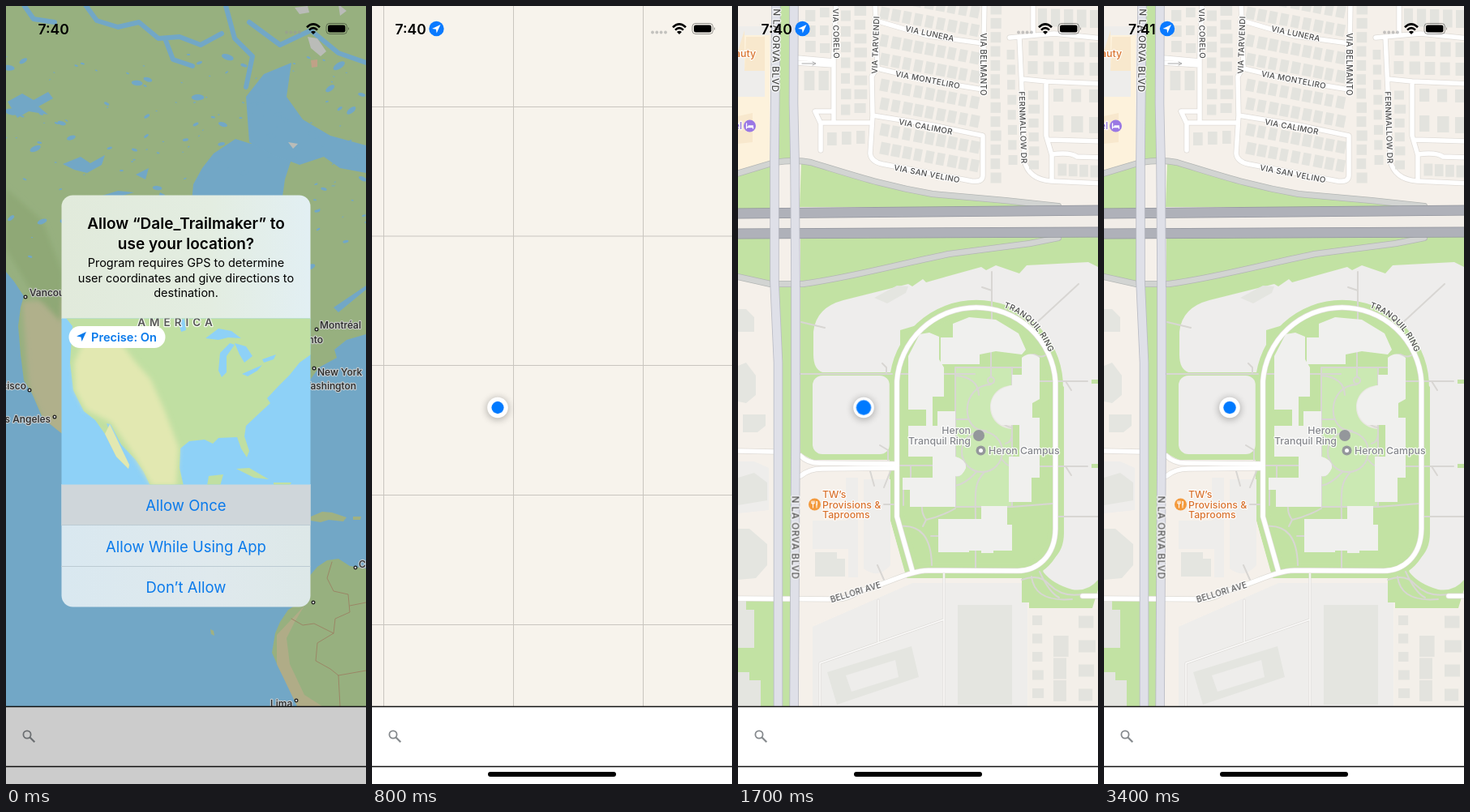
These frames come from a looping animation (444 px wide and 960 px high, 3.5 s). An HTML page:

```html
<!DOCTYPE html>
<html lang="en">
<head>
<meta charset="utf-8">
<title>Map permission</title>
<style>
html, body { margin: 0; width: 100%; height: 100%; overflow: hidden; background: #f7f3ec; }
svg { display: block; width: 100%; height: 100%; font-family: Inter, "Liberation Sans", sans-serif; }
.anim { animation: 3500ms step-end infinite; }
.smooth { animation-timing-function: linear; }
#world { animation-name: world; }
#alert { animation-name: alert; }
#press { animation-name: press; }
#dim { animation-name: dim; }
#home { animation-name: home; }
#streets { animation-name: streets; }
#buildings { animation-name: buildings; }
#labels { animation-name: labels; }
#dot { animation-name: late; }
#clockA { animation-name: early; }
#clockB { animation-name: second; }
#clockC { animation-name: third; }
#pulse { transform-origin: 155px 495.5px; animation-name: pulse; animation-timing-function: ease-in-out; }
@keyframes world { 0% { opacity: 1 } 5.714%, 100% { opacity: 0 } }
@keyframes alert { 0% { opacity: 1 } 2.857% { opacity: .8 } 5.714% { opacity: .4 } 8.571%, 100% { opacity: 0 } }
@keyframes press { 0% { opacity: 1 } 2.857% { opacity: .5 } 5.714%, 100% { opacity: 0 } }
@keyframes dim { 0% { opacity: .2 } 2.857% { opacity: .15 } 5.714% { opacity: .07 } 8.571% { opacity: .01 } 14.286%, 100% { opacity: 0 } }
@keyframes home { 0% { opacity: 0 } 2.857% { opacity: .15 } 5.714% { opacity: .45 } 8.571% { opacity: .9 } 14.286%, 100% { opacity: 1 } }
@keyframes streets { 0% { opacity: 0 } 28.571%, 100% { opacity: 1 } }
@keyframes buildings { 0%, 28.571% { opacity: 0 } 40%, 100% { opacity: 1 } }
@keyframes labels { 0%, 31.428% { opacity: 0 } 42.857%, 100% { opacity: 1 } }
@keyframes late { 0% { opacity: 0 } 22.857%, 100% { opacity: 1 } }
@keyframes early { 0% { opacity: 1 } 22.857%, 100% { opacity: 0 } }
@keyframes second { 0% { opacity: 0 } 22.857% { opacity: 1 } 82.857%, 100% { opacity: 0 } }
@keyframes third { 0% { opacity: 0 } 82.857%, 100% { opacity: 1 } }
@keyframes pulse { 0%, 21% { transform: scale(.78) } 62.2% { transform: scale(1) } 100% { transform: scale(.8) } }

.mid { text-anchor: middle; }
.end { text-anchor: end; }
.halo { paint-order: stroke; stroke: #fff; stroke-opacity: .85; stroke-width: 2.4; stroke-linejoin: round; }
.line { fill: none; stroke-linejoin: round; stroke-linecap: round; }
.water { fill: #8ed1f7; }
.road { fill: #4a4a4a; font-weight: 500; }
</style>
</head>
<body>
<svg viewBox="0 0 444 960" preserveAspectRatio="none">
<defs>
  <linearGradient id="head">
    <stop offset="0" stop-color="#e1eadb"/><stop offset=".6" stop-color="#e3ede1"/><stop offset="1" stop-color="#e2eff3"/>
  </linearGradient>
  <linearGradient id="foot">
    <stop offset="0" stop-color="#d9e8f0"/><stop offset=".6" stop-color="#dfe9ed"/><stop offset="1" stop-color="#dde8e8"/>
  </linearGradient>
  <filter id="shade" x="-60%" y="-60%" width="220%" height="220%"><feGaussianBlur stdDeviation="4"/></filter>
  <filter id="soft" x="-30%" y="-30%" width="160%" height="160%"><feGaussianBlur stdDeviation="3"/></filter>
  <clipPath id="card"><rect x="68.500" y="233.500" width="307" height="508" rx="14"/></clipPath>
  <clipPath id="mini"><rect x="68.500" y="385.500" width="307" height="205"/></clipPath>
  <clipPath id="land"><path id="america" d="M0 0H444V405L420 412 405 424 408 434 386 446 376 460 300 560H110L62 522 45 508 32 478 22 462 18 430 15 395 18 372 22 358 10 340 0 328Z"/></clipPath>

  <g id="boulevard" class="line">
    <path d="M47 -5L45 190V340L49.500 440V880"/>
    <path d="M69 -5L68.500 120 70 190 71 340V540L69 880"/>
  </g>
  <g id="freeway" class="line"><path d="M-9 256L453 252M-9 281L453 279"/></g>
  <g id="ramps" class="line">
    <path d="M-5 208L45 193Q70 189 90 193C140 208 180 222 240 232L330 240 395 247"/>
    <path d="M-5 333L40 343H80C140 335 200 318 260 306L360 293 395 286"/>
  </g>
  <g id="ways" class="line">
    <path d="M121 -5L118 60V143M73 64L118 68M73 70L118 73M95 130H118M95 130L102 145V178M102 144H165"/>
    <path d="M169 -5L172 75 165 87 166 135 163 182Q164 192 178 195L288 216Q302 218 302 209V160L240 147 166 135"/>
    <path d="M170 18L235 37 302 46M172 77L235 92 302 103M304 -5L302 103"/>
    <path d="M347 38L351 125 353 190Q358 214 386 216L450 219M350 90L380 93 450 96M380 93V160L387 184V215M383 165L450 167M387 183Q410 180 418 186L450 187M335 39L390 34 450 40M364 -5V35"/>
    <path d="M-5 549L45 550M77 555Q86 564 100 564L195 565M77 580Q88 571 104 571L195 570M425 728H450"/>
  </g>
  <g id="loop" class="line">
    <path d="M215 697L196 630V463A98 98 0 0 1 391.500 463V645C391 680 368 697 345 697L235 696.500C210 697 185 713 150 722Q135 732 122 732L-5 731"/>
  </g>
  <path id="arc" d="M300 367C338 368 372 390 387 437"/>
</defs>

<rect width="444" height="864" fill="#f7f3ec"/>
<path d="M14.500 0V864M174.500 0V864M334.500 0V864M0 124.500H444M0 284H444M0 443.500H444M0 603.500H444M0 763.500H444" stroke="#c9c5bf" fill="none"/>

<g id="world" class="anim">
  <rect width="444" height="864" class="water"/>
  <use href="#america" fill="#bcdc9f"/>
  <g clip-path="url(#land)">
    <path d="M20 365L80 360V540L50 520 28 470Z" fill="#dcdcae" filter="url(#soft)"/>
    <path d="M0 225L45 265 70 330 68 390 30 350 0 300Z" fill="#b2d293" filter="url(#soft)"/>
    <g id="lakes" class="water">
      <path d="M229 242L231 220 242 200 256 182 283 164 302 170 322 163 345 170 353 186 344 214 340 242Z"/>
      <path d="M300 168L296 112 318 84 352 70 346 112 366 140 400 160 444 172V206L412 200 392 186 362 196 330 184Z"/>
      <path d="M2 118L20 108 34 116 52 106 58 114 40 124 52 134 28 130 14 138Z"/>
      <path d="M70 195L92 186 104 194 122 184 118 196 100 206 84 202Z"/>
      <path d="M112 236L138 228 158 230 140 235ZM160 208L176 200 172 214ZM178 260L190 230 196 233 190 262Z"/>
    </g>
    <path class="line" stroke="#8ed1f7" stroke-width="6" d="M96 -4L112 18 138 26 164 20 188 40 214 38 240 48 266 34M270 -4L282 40 304 62 296 100M300 20L338 48 376 30 410 58 450 72M20 -4L34 16 60 20M196 40L206 66 230 74"/>
    <path d="M372 38L384 40 395 56 388 62 376 52ZM356 2L372 0 374 8 362 10ZM410 -2L420 6 412 12ZM348 168L360 170 354 176Z" fill="#e8ebe6"/>
    <path d="M376 67L384 66V75L377 76Z" fill="#f0c9a8"/>
    <path d="M404 372L444 345V350L410 378Z" class="water"/>
  </g>
  <path d="M376 630L390 624 402 625 420 631 416 636 398 634 388 637 376 635ZM428 630L438 630 437 634H428Z" fill="#c8dda2"/>
  <path d="M252 769L256 771 257 777 253 775Z" fill="#c8dda2"/>
  <path d="M444 694L424 691 410 682 396 684 384 692 372 706 364 735 348 745 338 760 332 774 328 798 336 816 348 838 360 866H444Z" fill="#bcdc9f"/>
  <path d="M368 740L356 760 346 780 350 812 368 850 390 864 360 866 334 812 334 776Z" fill="#dcd7a8"/>
  <path class="line" stroke="#c39a76" stroke-width=".8" d="M402 686L396 706 404 722 422 726 424 748 406 756 404 774M352 756L366 764 380 762 404 774 384 786 382 808 400 818 410 826 412 864M424 740L444 736M410 826L444 820"/>
  <g id="towns" font-size="12" font-weight="500" fill="#333"></g>
</g>

<g id="streets" class="anim">
  <rect width="444" height="864" fill="#f5f0ea"/>
  <path d="M0 36H39V205L0 208Z" fill="#fdf2dc"/>
  <path d="M0 25H38V36H8V80H33V112H0ZM0 562H20L38 570V622L0 626ZM92 766L215 712H357V864H92ZM370 744H444V772H378Z" fill="#eeedeb"/>
  <g fill="#c2e2a3">
    <path d="M50 0H66V190H48ZM0 207L45 194V250H0ZM78 193L100 196 160 217 240 233 360 243 390 248H76ZM0 287H40V340L0 332ZM46 344H70V864H50V440ZM0 731H44V864H0Z"/>
    <path d="M77 286L444 283V720L437 743H359V736H350V698L215 697 195 630V560H92L77 552Z"/>
  </g>
  <path d="M93 430V402Q96 372 130 363L210 343 215 346 228 337 232 341 300 322 306 326 318 320 347 330 356 320 432 316 444 322V708Q432 723 412 720 388 713 377 699 373 693 388 683 402 672 402 650V470L300 370 200 400V452H104Q93 448 93 430Z" fill="#eeedec"/>
  <rect x="92" y="456" width="95" height="97" rx="12" fill="#eeedec"/>
  <path d="M196 560V463A98 98 0 0 1 391.500 463V645C391 680 368 697 345 697H215L196 630Z" fill="#c2e2a3" stroke="#c2e2a3" stroke-width="18.500"/>
  <path d="M148 706H350V712H215L110 757 92 764V731H120ZM92 574H186V628L205 698 150 718H92Z" fill="#f5f0ea"/>
  <path d="M92 635H133V582H148V705H136V670H92ZM155 584H188V690Q172 708 155 694Z" fill="#eeedeb"/>
  <path d="M436 461H444V466H436ZM436 565H444V570H436Z" fill="#c2e2a3"/>
  <path d="M268 446H338V618H268Z" fill="#cbe9b3"/>
  <path d="M338 468C302 470 302 520 338 522ZM268 556Q282 560 281 570 276 582 268 580Z" fill="#e9e7e2"/>
  <g class="line" stroke="#d8d6d3" stroke-width="2" stroke-linecap="butt">
    <path d="M76 454H190M200 454H224M240 454H292M366 463H431M404 463L411 474M198 567H240M364 568H431M404 568L411 579M393 630H444"/>
    <path d="M268 446H338V618H268ZM338 446H353Q354 430 366 430 376 436 382 428M268 510L285 510M268 456Q296 458 297 480M338 618L388 614"/>
    <circle cx="301" cy="550" r="25"/><circle cx="312" cy="462" r="4"/>
    <path d="M312 467C274 468 274 526 306 524M338 472C314 474 314 518 338 520M330 540Q338 538 338 528M276 555Q284 568 272 580M326 560Q332 568 338 568M294 575Q280 590 268 592M304 575C290 590 293 600 293 640M293 663V695"/>
    <path d="M313 328V396M312 420V458M367 392L420 343M301 347L313 351M78 390L107 397M178 441L183 446V454M175 542L185 548V560M163 574L168 592M188 574L180 594M172 690L180 708M180 615H192"/>
    <path d="M199 642Q238 638 239 690M238 654H251M268 620Q250 630 232 634 226 626 227 616M232 634L228 642M213 568V596H204V616"/>
    <path d="M350 708Q372 700 384 714 400 730 424 726M362 704Q366 736 412 732M372 698Q384 724 396 730"/>
  </g>
  <g class="line" stroke="#dedcd9" stroke-width="3"><path id="thin" d="M173 733V784M254 699V870M101 870V811L254 757"/></g>
  <use href="#thin" class="line" stroke="#fbfaf9" stroke-width="1.500"/>

  <path d="M50 190H66V344H50Z" fill="#f5f0ea"/>
  <use href="#ramps" stroke="#b3b6b4" stroke-width="8"/><use href="#ramps" stroke="#d2d4d2" stroke-width="6.500"/>
  <path d="M0 262L444 258V273L0 275Z" fill="#f1ede8"/>
  <use href="#freeway" stroke="#92959d" stroke-width="13"/><use href="#freeway" stroke="#afb1b9" stroke-width="11.500"/>
  <use href="#ways" stroke="#dfdbd6" stroke-width="7"/><use href="#loop" stroke="#dfdcd6" stroke-width="7"/>
  <use href="#ways" stroke="#fff" stroke-width="5.500"/><use href="#loop" stroke="#fff" stroke-width="5.700"/>
  <use href="#boulevard" stroke="#b9bbc4" stroke-width="11.500"/><use href="#boulevard" stroke="#dfe0e8" stroke-width="9.800"/>

  <g id="buildings" class="anim smooth">
    <g fill="#f0f0ee">
      <path d="M265 392L285 384 318 387 346 404 355 424 350 430 318 426 298 430V442H250V409H265Z"/>
      <path d="M338 455H350V434Q360 425 372 434V485L363 490V508H372V582H362V612H334V556H347V517H325C306 506 306 474 338 468Z"/>
      <path d="M210 432L224 405 236 403 248 408V436L254 446V482H240V518H246V500H268V556Q282 560 281 570 276 582 268 580V618H212V597H203V582H240V556H210V518H217V498H210ZM247 633H300V617H332V640H338V672H315V675H300V672H285V674H247Z"/>
    </g>
    <path d="M217 498H232V518H217Z" fill="#c2e2a3"/>
    <g fill="#e4e5e0">
      <path d="M168 360L196 345 210 346 207 354 184 367ZM0 374H10L20 384V402H0ZM0 444L10 440 22 456V480L10 490 0 488ZM6 504H34V518L24 526H6ZM0 582L20 576 36 588V610L0 616ZM0 645H14L36 664V690L22 706 0 708Z"/>
      <path d="M95 674H122V682H132V704H95ZM110 822L214 790 223 828 122 862ZM271 739H338V862H271Z"/>
      <path d="M0 734H10V745H20V792H0ZM0 822H14V832H28V864H0Z"/>
      <path d="M8 30V55H0M10 38H33V80H8ZM0 136L18 132V168L0 170Z" fill="#f8e8cd"/>
    </g>
    <path d="M133 826L194 807 198 828 140 846Z" fill="#eeedeb"/>
    <path d="M358 744H444V864H358Z" fill="#f3efe9"/>
    <g id="houses" fill="#e3e3de"></g>
  </g>
  <g id="labels" class="anim smooth">
    <g id="names"></g>
    <text class="road halo" font-size="10" letter-spacing=".3"><textPath href="#arc" startOffset="28">TRANQUIL RING</textPath></text>
    <g font-size="12.300" font-weight="500">
      <g fill="#85878c" class="halo">
        <text class="end" x="287" y="528">Heron</text><text class="end" x="287" y="541">Tranquil Ring</text>
        <text x="309" y="553">Heron Campus</text>
      </g>
      <g fill="#d9732f" class="halo">
        <text x="104" y="607">TW’s</text><text x="104" y="619.500">Provisions &amp;</text><text x="104" y="632">Taprooms</text>
        <text class="end" x="22" y="63">auty</text>
      </g>
      <text class="end halo" x="5" y="152" fill="#9173d8">el</text>
    </g>
    <circle cx="297" cy="530" r="7" fill="#94979b"/>
    <circle cx="299.500" cy="548.500" r="6" fill="#94979b"/><circle cx="299.500" cy="548.500" r="2.500" fill="#fff"/>
    <circle cx="94.500" cy="615" r="7.500" fill="#f39a3d"/>
    <path d="M92.500 611V619M90.800 611V614H94.200V611M97 619V611Q98.500 613 97 616" class="line" stroke="#fff"/>
    <circle cx="14.500" cy="148" r="7.500" fill="#9a78e4"/>
    <path d="M10.500 145V151M10.500 149.500H18.500V151M13 148H18.500" class="line" stroke="#fff" stroke-width="1.300"/>
    <path d="M79 71H95M92 69L96 71 92 73" class="line" stroke="#aaa"/>
  </g>
</g>

<g id="dot" class="anim">
  <circle cx="155" cy="497" r="14" fill="#000" opacity=".25" filter="url(#shade)"/>
  <circle cx="155" cy="495.500" r="12.800" fill="#fff"/>
  <circle id="pulse" class="anim" cx="155" cy="495.500" r="9.700" fill="#007aff"/>
</g>

<rect y="864" width="444" height="96" fill="#fff"/>
<path d="M0 864.500H444M0 938.500H444" stroke="#111" stroke-width="1.300"/>
<g fill="none" stroke="#85898d" stroke-width="1.800"><circle cx="26" cy="899" r="4.600"/><path d="M29.500 902.500L35.300 908.300" stroke-width="2.200"/></g>
<rect id="dim" class="anim" width="444" height="960"/>
<rect id="home" class="anim" x="143" y="945" width="158" height="6" rx="3"/>

<g id="alert" class="anim">
  <g clip-path="url(#card)">
    <rect x="68" y="233" width="308" height="153" fill="url(#head)"/>
    <rect x="68" y="590" width="308" height="152" fill="url(#foot)"/>
    <rect id="press" class="anim" x="68" y="590" width="308" height="51" fill="#cfd6da"/>
    <path d="M68 640.500H376M68 691.500H376" stroke="#bccbd3"/>
  </g>
  <g clip-path="url(#mini)">
    <rect x="68" y="385" width="308" height="206" class="water"/>
    <path d="M68 385H376V430L362 440 350 455 336 469 322 484 326 490 314 501 296 518 294 531 300 549 297 557 290 546 285 532 262 533 255 540 245 535 226 537 215 546 214 570 219 592H178L170 575 160 560 142 541 129 516 124 515 134 540 152 566 151 571 136 556 122 528 110 511 96 500 83 474 79 440 82 395 74 385Z" fill="#c0dfa2"/>
    <path d="M84 440L100 405 130 400 160 440 178 460 196 500 213 545 210 592H180L160 558 130 514 98 498 85 474Z" fill="#e2e8b1" filter="url(#soft)"/>
    <path d="M128 516L152 566 151 571 136 556 122 528Z" fill="#e2e8b1"/>
    <path d="M284 571L300 570 324 584 306 582ZM250 580L268 578 264 592H248ZM330 588H352L350 591H330Z" fill="#c0dfa2"/>
    <path class="water" d="M246 410L262 398 278 401 290 410 274 409 262 412ZM262 450L264 428 276 416 282 418 272 432 272 452 266 458ZM282 416L296 420 304 432 294 440 288 430ZM291 454L316 443 310 450 298 457ZM316 436L333 430 330 436 318 440ZM212 388L220 386 222 400 216 402Z"/>
    <text class="mid halo" x="211" y="395" font-size="13.500" font-weight="600" fill="#555" letter-spacing="5">AMERICA</text>
    <rect x="77.500" y="395" width="119" height="27" rx="13.500" fill="#fff"/>
  </g>
  <path d="M99 402L87 407.500 92.500 408.500 93.500 414Z" fill="#0a7aeb"/>
  <text x="105" y="413.500" font-size="14.600" font-weight="600" fill="#0a7aeb">Precise: On</text>
  <g class="mid">
    <g font-size="19" font-weight="600"><text x="222" y="274.500">Allow “Dale_Trailmaker” to</text><text x="222" y="299.500">use your location?</text></g>
    <g font-size="14.500"><text x="222" y="322">Program requires GPS to determine</text><text x="222" y="340.500">user coordinates and give directions to</text><text x="222" y="358.500">destination.</text></g>
    <g font-size="18.500" fill="#0a7aeb"><text x="222" y="623">Allow Once</text><text x="222" y="673.500">Allow While Using App</text><text x="222" y="724">Don’t Allow</text></g>
  </g>
</g>

<defs><g id="gps"><circle cx="79.500" cy="28" r="9.200" fill="#0a7aff"/><path d="M84.500 23L74 28 79 28.700 79.700 33.600Z" fill="#fff"/></g></defs>
<g font-size="17.500" font-weight="600">
  <text id="clockA" class="anim" x="39.500" y="34.500">7:40</text>
  <g id="clockB" class="anim"><text x="28.500" y="34.500">7:40</text><use href="#gps"/></g>
  <g id="clockC" class="anim"><text x="30" y="34.500">7:41</text><use href="#gps" x="-1.500"/></g>
</g>
<g fill="#999" fill-opacity=".55"><circle cx="346" cy="32.500" r="1.900"/><circle cx="351.300" cy="32.500" r="1.900"/><circle cx="356.600" cy="32.500" r="1.900"/><circle cx="362" cy="32.500" r="1.900"/></g>
<g fill="none" stroke="#000" stroke-width="2.600"><path d="M371 26.200Q379 18.500 387 26.200M374 29.600Q379 24.800 384 29.600"/></g>
<path d="M376 32Q379 29.600 382 32L379 35Z"/>
<rect x="395" y="21.500" width="25.500" height="13" rx="4" fill="none" stroke="#000" stroke-opacity=".4"/>
<rect x="397" y="23.500" width="21.500" height="9" rx="2.300"/>
<path d="M422 26Q424 28 422 30Z" opacity=".45"/>
</svg>
<script>
const NS = 'http://www.w3.org/2000/svg';
const $ = id => document.getElementById(id);
function add(parent, tag, attrs, text) {
  const e = document.createElementNS(NS, tag);
  for (const k in attrs) e.setAttribute(k, attrs[k]);
  if (text) e.textContent = text;
  parent.append(e);
}
let seed = 11;
const rnd = () => (seed = seed * 16807 % 2147483647) / 2147483647;

// small lakes scattered over the north
for (let i = 0; i < 190; i++) {
  const x = rnd() * 444, y = 60 + Math.pow(rnd(), 1.2) * 270, r = .8 + rnd() ** 3 * 5;
  add($('lakes'), 'ellipse', { cx: x, cy: y, rx: r * 1.5, ry: r * .7, transform: `rotate(${-40 + rnd() * 70} ${x} ${y})` });
}

const town = (text, x, y, cx, cy, cls = '') => {
  if (text) add($('towns'), 'text', { x, y, class: 'halo ' + cls }, text);
  if (cx) add($('towns'), 'circle', { cx, cy, r: 1.9, fill: '#fff', stroke: '#222', 'stroke-width': 1.2 });
};
town('Vancouver', 29, 358, 24, 359);
town('San Francisco', 25, 473, 29, 474, 'end');
town('Los Angeles', 55, 514, 60, 507, 'end');
town('Montréal', 387, 398, 383, 399);
town('Toronto', 391, 416, 0, 0, 'end');
town('New York', 384, 456, 380, 447);
town('Washington', 432, 473, 0, 0, 'end');
town('Caracas', 435, 693, 431, 693);
town('', 0, 0, 379, 736);
town('Lima', 326, 865, 358, 857);

// evenly spaced houses from one point to another
function row(x0, y0, x1, y1, n, w, h, turn = 0) {
  for (let i = 0; i < n; i++) {
    const f = n > 1 ? i / (n - 1) : 0, x = x0 + (x1 - x0) * f, y = y0 + (y1 - y0) * f;
    const k = .85 + rnd() * .2;
    add($('houses'), 'rect', { x: x - w / 2, y: y - h / 2, width: w * k, height: h, transform: `rotate(${turn} ${x} ${y})` });
  }
}
for (const y of [-20, 37, 92, 147])
  for (const d of [16, 39]) row(181, y + d - 10, 292, y + d + 11, 9, 11, 15, 11);
row(318, 4, 318, 212, 13, 13, 13);
row(151, 6, 151, 126, 8, 15, 12);
row(133, 12, 133, 128, 7, 12, 13);
row(90, 12, 90, 50, 3, 14, 14);
row(107, 8, 107, 52, 3, 12, 12);
row(88, 92, 106, 92, 2, 13, 24);
row(116, 164, 152, 162, 3, 12, 16);
row(337, 60, 339, 190, 8, 11, 12);
row(365, 52, 440, 54, 5, 13, 18);
row(364, 76, 440, 78, 5, 13, 16);
row(365, 110, 366, 196, 6, 14, 11);
row(396, 110, 440, 111, 3, 14, 16);
row(396, 145, 440, 147, 3, 14, 20);
row(400, 202, 440, 204, 4, 11, 15);
row(376, 14, 440, 16, 5, 12, 22);
row(370, 758, 370, 848, 5, 14, 12);
row(398, 790, 398, 845, 3, 18, 26);
row(430, 760, 430, 850, 4, 20, 15);

const name = (text, x, y, turn, size = 9.8, gap = .3) => add($('names'), 'text', {
  x, y, dy: size * .36, class: 'road halo mid', 'font-size': size, 'letter-spacing': gap, transform: `rotate(${turn} ${x} ${y})`
}, text);
name('N LA ORVA BLVD', 47, 55, 91, 11.8, .5);
name('N LA ORVA BLVD', 70.5, 656, 90, 11.8, .5);
name('VIA CORELO', 121, 34, 89);
name('VIA TARVENDI', 169.5, 48, -88);
name('VIA LUNERA', 236.5, 34, 12);
name('VIA MONTELIRO', 234, 91, 11);
name('VIA BELMANTO', 302.5, 72, 90);
name('VIA CALIMOR', 231.5, 149, 11);
name('VIA SAN VELINO', 233, 207, 11);
name('FERNMALLOW DR', 351.5, 150, 88);
name('BELLORI AVE', 145, 723, -17);
</script>
</body>
</html>
```
